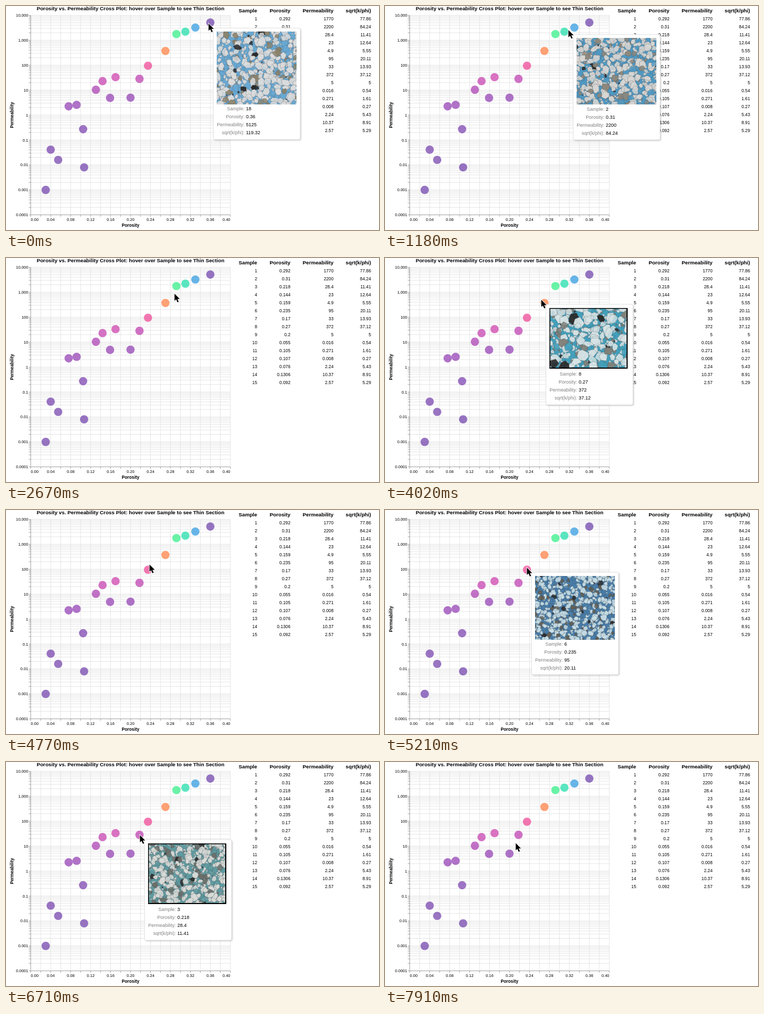
Animation of 701x421 px, one loop 8 s. Source, as an HTML page with a canvas:

```html
<!DOCTYPE html>
<html lang="en">
<head>
<meta charset="utf-8">
<title>Porosity vs. Permeability</title>
<style>
  html, body { margin: 0; width: 100%; height: 100%; overflow: hidden; background: #fff; }
  canvas { display: block; }
</style>
</head>
<body>
<canvas id="stage" width="701" height="421"></canvas>
<script>
const LOOP = 8000, STEP = 148;
const FONT = '"Liberation Sans", Arial, Helvetica, sans-serif';
const LEFT = 46.5, TOP = 17.5, SIZE = 375, RIGHT = LEFT + SIZE, BOTTOM = TOP + SIZE;
const HIT = 9.5;

const xOf = phi => LEFT + SIZE * phi / 0.4;
const yOf = k => TOP + SIZE * (4 - Math.log10(k)) / 8;

// Porosity and permeability, in order of sample number
const samples = [
  [0.292, 1770], [0.31, 2200], [0.218, 28.4], [0.144, 23], [0.159, 4.9],
  [0.235, 95], [0.17, 33], [0.27, 372], [0.2, 5], [0.055, 0.016],
  [0.105, 0.271], [0.107, 0.008], [0.076, 2.24], [0.1306, 10.37], [0.092, 2.57],
  [0.03, 0.001], [0.04, 0.041], [0.36, 5125], [0.33, 3240]
].map(([phi, k], i) => ({ id: i + 1, phi, k, x: xOf(phi), y: yOf(k), ratio: Math.sqrt(k / phi) }));
const maxRatio = Math.max(...samples.map(s => s.ratio));

// Columns of the table and rows of the tooltip
const fields = [
  ['Sample', 472, s => s.id], ['Porosity', 534.5, s => s.phi],
  ['Permeability', 615.5, s => s.k], ['sqrt(k/phi)', 686, s => +s.ratio.toFixed(2)]
];

// Thin sections by sample number
const sections = {
  18: { h: 136.5, grain: 13, pore: '#68a8d2', pale: '#dcdcdc', dull: '#8c836c' },
  19: { h: 123, grain: 10, pore: '#3d86b5', pale: '#d6c9c3', dull: '#8b7d79' },
  8: { h: 116, grain: 16, pore: '#429fbb', pale: '#d6e2e4', dull: '#807f78', framed: true },
  6: { h: 119.5, grain: 9, pore: '#487ca8', pale: '#c9dfe7', dull: '#625d52' },
  3: { h: 116, grain: 11, pore: '#5f9aa0', pale: '#d9dbd8', dull: '#6b6e69', framed: true },
  2: { h: 125, grain: 12, pore: '#4f98c2', pale: '#d8d6d3', dull: '#8d877c' },
  1: { h: 150, grain: 13, pore: '#579cc4', pale: '#dadad7', dull: '#8a8478' }
};

// Straight pointer moves: start, number of steps, end point
const moves = [
  [0, 1, 380, 32.5], [450, 4, 339, 47], [1050, 3, 354, 40], [2220, 1, 351.5, 41],
  [2370, 3, 316, 66.5], [2820, 4, 293.5, 78.5], [4020, 1, 293, 78],
  [4320, 5, 263, 108], [5060, 2, 266, 108], [6110, 5, 251, 137], [7760, 2, 245, 152]
];

const ctx = document.getElementById('stage').getContext('2d');

function line(x1, y1, x2, y2, color) {
  ctx.strokeStyle = color;
  ctx.lineWidth = 0.75;
  ctx.beginPath();
  ctx.moveTo(x1, y1);
  ctx.lineTo(x2, y2);
  ctx.stroke();
}

function text(str, x, y, size, align = 'right', weight = '', color = '#000') {
  ctx.font = `${weight} ${size}px ${FONT}`;
  ctx.textAlign = align;
  ctx.fillStyle = color;
  ctx.fillText(str, x, y + size * 0.35);
}

// Cubehelix rainbow
function rainbow(t) {
  const d = Math.abs(t - 0.5), l = 0.8 - 0.9 * d;
  const a = (1.5 - 1.5 * d) * l * (1 - l);
  const h = (360 * t + 20) * Math.PI / 180, c = Math.cos(h), s = Math.sin(h);
  const rgb = [-0.14861 * c + 1.78277 * s, -0.29227 * c - 0.90649 * s, 1.97294 * c];
  return `rgba(${rgb.map(v => Math.round(255 * Math.min(1, Math.max(0, l + a * v))))},0.72)`;
}

function randomizer(seed) {
  return () => (seed = seed * 16807 % 2147483647) / 2147483647;
}

function makeSection(id) {
  const { h, grain, pore, pale, dull, framed } = sections[id];
  const image = document.createElement('canvas');
  const w = image.width = framed ? 147 : 150;
  const height = image.height = Math.round(framed ? h - 2 : h);
  const g = image.getContext('2d');
  const rand = randomizer(id * 7919 + 13);

  // Angular grain, stretched along a random direction
  function blob(x, y, r) {
    const n = 5 + Math.floor(rand() * 3), turn = rand() * 6, squash = 0.6 + rand() * 0.4;
    const kind = rand();
    g.save();
    g.translate(x, y);
    g.rotate(turn);
    g.scale(1, squash);
    g.beginPath();
    for (let i = 0; i < n; i++) {
      const a = (i + rand() * 0.5) / n * 2 * Math.PI, q = r * (0.85 + rand() * 0.35);
      g.lineTo(q * Math.cos(a), q * Math.sin(a));
    }
    g.closePath();
    g.globalAlpha = 0.8 + rand() * 0.2;
    g.fillStyle = kind < 0.7 ? pale : kind < 0.84 ? dull : kind < 0.97 ? pore : '#2b2a2a';
    g.fill();
    g.stroke();
    g.restore();
  }

  g.fillStyle = pore;
  g.fillRect(0, 0, w, height);
  g.strokeStyle = 'rgba(60,65,68,0.45)';
  g.lineWidth = 0.7;
  for (let i = 0; i < 500; i++) blob(rand() * w, rand() * height, 1 + rand() * grain * 0.2);
  const step = grain * 0.82;
  for (let y = 0; y < height + step; y += step)
    for (let x = 0; x < w + step; x += step)
      blob(x + (rand() - 0.5) * step, y + (rand() - 0.5) * step, grain * (0.3 + rand() * 0.4));
  if (framed) {
    g.strokeStyle = '#000';
    g.lineWidth = 3;
    g.strokeRect(0, 0, w - 0.5, height - 0.5);
  }
  return image;
}
const images = {};
for (const id in sections) images[id] = makeSection(+id);

function drawChart() {
  for (let i = 0; i <= 20; i++) {
    const x = xOf(i * 0.02);
    line(x, TOP, x, BOTTOM, '#ddd');
    line(x, BOTTOM, x, BOTTOM + 3.75, '#888');
    if (i % 2) continue;
    const align = i === 0 ? 'left' : i === 20 ? 'right' : 'center';
    text((i * 0.02).toFixed(2), x, 401.5, 7.5, align);
  }
  for (let e = -4; e <= 4; e++) {
    const value = 10 ** e;
    for (let m = 1; m <= (e < 4 ? 9 : 1); m++) {
      const y = yOf(m * value);
      line(LEFT, y, RIGHT, y, '#ddd');
      line(LEFT - 3.75, y, LEFT, y, '#888');
    }
    text(e < 0 ? value.toFixed(-e) : value.toLocaleString('en-US'), 41.7, yOf(value), 7.5);
  }
  line(LEFT, TOP, LEFT, BOTTOM, '#888');
  line(LEFT, BOTTOM, RIGHT, BOTTOM, '#888');

  text('Porosity vs. Permeability Cross Plot: hover over Sample to see Thin Section',
    LEFT + SIZE / 2, 5, 9.75, 'center', 'bold');
  text('Porosity', LEFT + SIZE / 2, 412.5, 8.25, 'center', 'bold');
  ctx.save();
  ctx.translate(11.5, TOP + SIZE / 2);
  ctx.rotate(-Math.PI / 2);
  text('Permeability', 0, 0, 8.25, 'center', 'bold');
  ctx.restore();

  for (const s of samples) {
    ctx.fillStyle = rainbow(s.ratio / maxRatio);
    ctx.beginPath();
    ctx.arc(s.x, s.y, 7.8, 0, 7);
    ctx.fill();
  }
}

function drawTable() {
  for (const [title, x, value] of fields) {
    text(title, x, 9, 9.75, 'right', 'bold');
    samples.slice(0, 15).forEach((s, i) => text(value(s), x, 24.3 + i * 15, 8.25));
  }
}

function drawTooltip(s, x, y) {
  const { h } = sections[s.id];
  ctx.save();
  ctx.shadowColor = 'rgba(0,0,0,0.22)';
  ctx.shadowBlur = 3;
  ctx.shadowOffsetX = ctx.shadowOffsetY = 1.5;
  ctx.fillStyle = '#fff';
  ctx.beginPath();
  ctx.roundRect(x, y, 163.5, h + 73, 3);
  ctx.fill();
  ctx.restore();
  ctx.strokeStyle = '#d9d9d9';
  ctx.lineWidth = 0.75;
  ctx.stroke();
  ctx.drawImage(images[s.id], Math.round(x + 6.6), Math.round(y + 6.5));
  fields.forEach(([key, , value], i) => {
    const rowY = y + h + 15 + i * 15;
    text(key + ':', x + 58.8, rowY, 9, 'right', '', '#808080');
    text(value(s), x + 61.5, rowY, 9, 'left');
  });
}

const arrow = new Path2D('M0 0V13.6L3.1 10.8L5.5 16.2L7.9 15.2L5.5 9.9H9.9Z');
function drawPointer(x, y) {
  ctx.save();
  ctx.translate(x + 0.7, y + 0.5);
  ctx.strokeStyle = '#fff';
  ctx.lineWidth = 1.6;
  ctx.stroke(arrow);
  ctx.fillStyle = '#000';
  ctx.fill(arrow);
  ctx.restore();
}

function pointerAt(t) {
  const i = moves.findLastIndex(m => m[0] <= t);
  const [begin, steps, x, y] = moves[i];
  const [, , fromX, fromY] = moves[Math.max(0, i - 1)];
  const u = Math.min(1, (Math.floor((t - begin) / STEP) + 1) / steps);
  return [fromX + (x - fromX) * u, fromY + (y - fromY) * u];
}

const start = performance.now();
function draw() {
  const [x, y] = pointerAt((performance.now() - start) % LOOP);
  const hovered = samples.find(s => Math.hypot(s.x - x, s.y - y) < HIT);
  ctx.fillStyle = '#fff';
  ctx.fillRect(0, 0, 701, 421);
  drawChart();
  drawTable();
  if (hovered) drawTooltip(hovered, x + 9.5, y + 9);
  drawPointer(x, y);
  requestAnimationFrame(draw);
}
draw();
</script>
</body>
</html>
```
